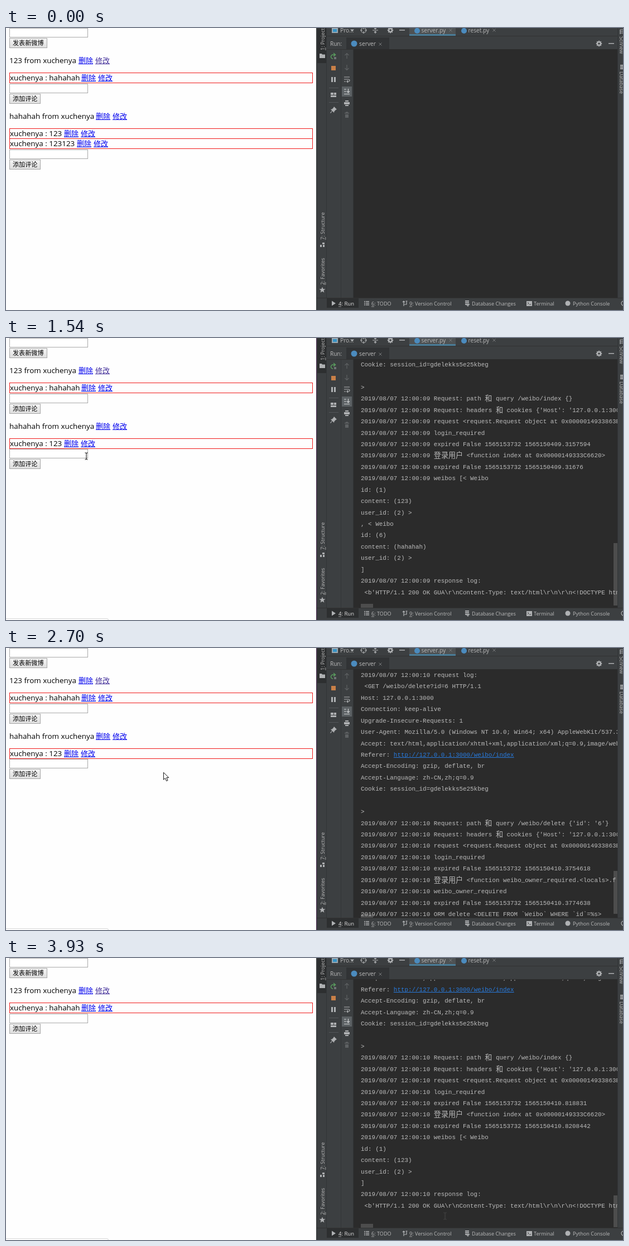
Write an HTML page with a canvas that moves like this. It is 1106 by 506 pixels and loops after 4.02 s.

```html
<!DOCTYPE html>
<html lang="zh">
<head>
<meta charset="utf-8">
<title>Weibo server log</title>
<style>
html, body { margin: 0; width: 100%; height: 100%; overflow: hidden; background: #fefefe; }
canvas { display: block; width: 1106px; height: 506px; }
</style>
</head>
<body>
<canvas id="stage"></canvas>
<script>
const W = 1106, H = 506, LOOP = 4020, USER = 'xuchenya';
const canvas = document.getElementById('stage');
const c = canvas.getContext('2d');
const dpr = window.devicePixelRatio || 1;
canvas.width = W * dpr;
canvas.height = H * dpr;

const SANS = '"Open Sans", "Noto Sans CJK SC", "Noto Sans CJK", sans-serif';
const CJK = '"Noto Sans CJK SC", "Noto Sans CJK", sans-serif';
const MONO = '"Liberation Mono", monospace';
const PANEL = '#3c3f41', DARK = '#2b2b2b', ICON = '#afb1b3', LABEL = '#bbbbbb', DIM = '#5e6163';
const CELL = 6.54, PITCH = 20.43;

// ---------- helpers ----------
function rect(x, y, w, h, fill) {
  c.fillStyle = fill;
  c.fillRect(x, y, w, h);
}
function frame(x, y, w, h, color) {
  c.strokeStyle = color;
  c.lineWidth = 1;
  c.strokeRect(x + .5, y + .5, w - 1, h - 1);
}
function text(s, x, y, size, color, family = SANS) {
  c.font = size + 'px ' + family;
  c.fillStyle = color;
  c.fillText(s, x, y);
}
function path(d, x, y, color, width = 1.2) {
  c.save();
  c.translate(x, y);
  c.strokeStyle = color;
  c.lineWidth = width;
  c.stroke(new Path2D(d));
  c.restore();
}
function shape(d, x, y, color) {
  c.save();
  c.translate(x, y);
  c.fillStyle = color;
  c.fill(new Path2D(d));
  c.restore();
}
function dot(x, y, r, color) {
  c.fillStyle = color;
  c.beginPath();
  c.arc(x, y, r, 0, 7);
  c.fill();
}
function turned(s, x, y, angle, underline) {
  c.save();
  c.translate(x, y);
  c.rotate(angle);
  text(s, 0, 0, 9.1, LABEL);
  if (underline) rect(0, 1.5, 5, .8, LABEL);
  c.restore();
}
function gear(x, y) {
  for (let i = 0; i < 8; i++) {
    c.save();
    c.translate(x, y);
    c.rotate(i * Math.PI / 4);
    rect(-1.1, -5.2, 2.2, 3, ICON);
    c.restore();
  }
  c.strokeStyle = ICON;
  c.lineWidth = 2;
  c.beginPath();
  c.arc(x, y, 2.8, 0, 7);
  c.stroke();
}
const cross = (x, y) => path('M-2.5-2.5L2.5 2.5M2.5-2.5L-2.5 2.5', x, y, '#77797b', 1);

// ---------- web page ----------
function link(s, x, mid, color = '#0000ee') {
  text(s, x, mid + 5, 13, color, CJK);
  rect(x, mid + 6, 26, 1, color);
}
function links(x, mid, first, second) {
  link('删除', x, mid, first);
  link('修改', x + 30, mid, second);
}
function input(y) {
  rect(6, y, 141, 17, '#ffffff');
  frame(6, y, 141, 17, '#a9a9a9');
}
function button(s, y, w) {
  const g = c.createLinearGradient(0, y, 0, y + 18);
  g.addColorStop(0, '#f6f6f6');
  g.addColorStop(1, '#dddddd');
  rect(6, y, w, 18, g);
  frame(6, y, w, 18, '#a6a6a6');
  text(s, 12, y + 13, 11.1, '#000', CJK);
}
function comment(s, x, y, hot) {
  frame(6, y, 544, 19, '#f01818');
  text(USER + ' : ' + s, 7, y + 14, 13.4, '#000');
  links(x, y + 9, hot);
}
function form(y) {
  input(y);
  button('添加评论', y + 18, 56);
}
function page(t) {
  rect(0, 0, 556, H, '#fefefe');
  input(0);
  button('发表新微博', 18, 68);
  text('123 from ' + USER, 6, 63, 13.4, '#000');
  links(130, 58, undefined, '#44309a');
  comment('hahahah', 135, 80);
  form(100);
  if (t < 2780) {
    const pressed = t >= 2320 && t < 2390;
    text('hahahah from ' + USER, 6, 163, 13.4, '#000');
    links(161, 158, pressed ? '#ff0000' : undefined);
    comment('123', 104, 180);
    const two = t < 1460;
    if (two) comment('123123', 127, 198, t >= 1150 && t < 1230 ? '#ff0000' : undefined);
    form(two ? 218 : 199);
  }
  if (t >= 770) {
    c.strokeStyle = '#d8d8d8';
    c.lineWidth = 1;
    c.beginPath();
    c.moveTo(0, 503.5);
    c.lineTo(181, 503.5);
    c.quadraticCurveTo(183.5, 503.5, 183.5, 506);
    c.stroke();
  }
}

// ---------- console ----------
const stamp = sec => '2019/08/07 12:00:' + sec + ' ';
const head = (sec, url) => [
  stamp(sec) + 'request log:',
  ` <GET ${url} HTTP/1.1`,
  'Host: 127.0.0.1:3000',
  'Connection: keep-alive',
  'Upgrade-Insecure-Requests: 1',
  'User-Agent: Mozilla/5.0 (Windows NT 10.0; Win64; x64) AppleWebKit/537.36',
  'Accept: text/html,application/xhtml+xml,application/xml;q=0.9,image/webp',
  'Referer: http://127.0.0.1:3000/weibo/index',
  'Accept-Encoding: gzip, deflate, br',
  'Accept-Language: zh-CN,zh;q=0.9',
  'Cookie: session_id=gdelekks5e25kbeg',
  '',
  '>'
];
const routed = (sec, query, clock) => [
  'Request: path 和 query ' + query,
  "Request: headers 和 cookies {'Host': '127.0.0.1:3000'",
  'request <request.Request object at 0x0000014933863B00>',
  'login_required',
  'expired False 1565153732 ' + clock
].map(s => stamp(sec) + s);
const weibo = (id, content) => [`id: (${id})`, `content: (${content})`, 'user_id: (2) >'];
const indexLog = (sec, a, b, items) => [
  ...routed(sec, '/weibo/index {}', a),
  stamp(sec) + '登录用户 <function index at 0x00000149333C6620>',
  stamp(sec) + 'expired False 1565153732 ' + b,
  stamp(sec) + 'weibos [< Weibo',
  ...items,
  ']',
  stamp(sec) + 'response log:',
  String.raw` <b'HTTP/1.1 200 OK GUA\r\nContent-Type: text/html\r\n\r\n<!DOCTYPE html>`
];
const INDEX = '/weibo/index';
const received = sec => [...head(sec, INDEX).slice(4, 11), '', '', ...head(sec, INDEX)];

const views = [
  { at: 1380, y: 40, bar: [385, 57], lines: received('09') },
  { at: 1460, y: 47, bar: [368, 112], lines: [
    ...head('09', INDEX).slice(10),
    ...indexLog('09', '1565150409.3157594', '1565150409.31676',
      [...weibo(1, '123'), ', < Weibo', ...weibo(6, 'hahahah')])] },
  { at: 2620, y: 48, bar: [400, 77], lines: [
    ...head('10', '/weibo/delete?id=6'),
    ...routed('10', "/weibo/delete {'id': '6'}", '1565150410.3754618'),
    stamp('10') + '登录用户 <function weibo_owner_required.<locals>.f',
    stamp('10') + 'weibo_owner_required',
    stamp('10') + 'expired False 1565153732 1565150410.3774638',
    stamp('10') + 'ORM delete <DELETE FROM `Weibo` WHERE `id`=%s>'] },
  { at: 2780, y: 40, bar: [385, 57], lines: received('10') },
  { at: 2930, y: 35.3, bar: [426, 57], lines: [
    ...head('10', INDEX).slice(6),
    ...indexLog('10', '1565150410.818831', '1565150410.8208442', weibo(1, '123'))] }
];

function logLine(s, y) {
  let x = 636;
  for (const run of s.match(/[\u4e00-\u9fff]+|http:\S+|(?:(?!http:)[^\u4e00-\u9fff])+/g) || []) {
    const wide = /[\u4e00-\u9fff]/.test(run), url = run.startsWith('http:');
    const w = run.length * CELL * (wide ? 2 : 1);
    text(run, x, y + (wide ? 5 : 4), wide ? CELL * 2 : CELL / .6, url ? '#287bde' : LABEL, wide ? CJK : MONO);
    if (url) rect(x, Math.round(y) + 5, w, 1, '#287bde');
    x += w;
  }
}
function consoleView(t) {
  rect(623, 38, 473, 446, DARK);
  const view = views.filter(v => v.at <= t).pop();
  if (!view) return;
  c.save();
  c.beginPath();
  c.rect(623, 39, 473, 445);
  c.clip();
  rect(1089, view.bar[0], 7, view.bar[1], '#4d4d4d');
  rect(636, 477, 22, 7, '#4d4d4d');
  view.lines.forEach((s, i) => logLine(s, view.y + i * PITCH));
  c.restore();
}

// ---------- IDE ----------
function topBar() {
  rect(584, 0, 11, 9, '#9aa7b0');
  rect(586, 2, 7, 5, '#3592c4');
  text('Pro...', 599, 8, 10.2, LABEL);
  shape('M-3-1.5H4L.5 2.5Z', 620, 4, ICON);
  path('M4.5 0A4.5 4.5 0 1 1-4.5 0A4.5 4.5 0 1 1 4.5 0M0-6V-2M0 2V6M-6 0H-2M2 0H6', 641, 4, ICON);
  path('M-5 0H5M0-6V-2M-2-4L0-2L2-4M0 6V2M-2 4L0 2L2 4', 662, 4, ICON);
  gear(689, 4);
  rect(705, 3, 10, 1.5, ICON);
  rect(723, 0, 83, 11, '#4e5254');
  rect(723, 11, 83, 3, '#4a7d99');
  for (const [x, s, end] of [[737, 'server.py', 797], [821, 'reset.py', 875]]) {
    dot(x, 5, 5, '#4b8bbe');
    text(s, x + 7.5, 8, 10.2, LABEL);
    cross(end, 4);
  }
  rect(575, 14, 522, 1, '#323232');
}
function runHeader() {
  text('Run:', 581, 32, 10, LABEL);
  rect(610, 17, 77, 21, '#313335');
  dot(624, 28, 5.5, '#4b8bbe');
  text('server', 633, 32, 10.3, LABEL);
  cross(671, 29);
  gear(1063, 28);
  rect(1080, 27, 10, 1.5, ICON);
  rect(575, 38, 522, 1, '#323232');
}
function runTools() {
  rect(600, 39, 1, 445, '#323537');
  rect(622, 39, 1, 445, '#323537');
  path('M3-3H-1A3.5 3.5 0 0 0-1 4M0-6L3.5-3L0 0', 587, 51, '#599e5e', 1.5);
  rect(588, 52, 4, 4, '#707375');
  rect(583, 68, 8, 8, '#c88048');
  rect(583, 88, 3, 9, ICON);
  rect(588, 88, 3, 9, ICON);
  rect(579, 107, 17, 1, '#54575a');
  rect(582, 116, 5, 4, ICON);
  rect(588, 116, 4, 4, ICON);
  rect(582, 121, 10, 3, ICON);
  rect(579, 133, 17, 1, '#54575a');
  shape('M1-6L6-1L4 0L1.5 2.5L1 5L-2 2L-5 6L-6 5L-2.5 1.5L-5-1L-2.5-1.5L0-4Z', 587, 147, ICON);
  path('M0 5V-4M-3.5-1L0-4.5L3.5-1', 611, 50, DIM);
  path('M0-5V4M-3.5 1L0 4.5L3.5 1', 611, 71, DIM);
  path('M-5-4H5M-5 0H3A2 2 0 0 1 3 4H0M2 2L0 4L2 6M-5 4H-2', 611, 92, ICON);
  rect(602, 105, 18, 18, '#5c6164');
  path('M-5-4H-1M-5 0H-1M-5 4.5H5M2.5-5V2M0-.5L2.5 2L5-.5', 611, 114, '#d0d2d3');
  rect(608, 130, 6, 2, ICON);
  rect(606, 133, 10, 4, ICON);
  rect(608, 138, 6, 2, ICON);
  rect(607, 152, 8, 1.5, DIM);
  rect(609, 150.5, 4, 1.5, DIM);
  rect(608, 155, 6, 6, DIM);
}
function sideBars() {
  rect(558, 0, 17, 63, '#2d2f30');
  turned('1: Project', 571, 40, -Math.PI / 2, true);
  shape('M-5-4H-1L0-2.5H5V4H-5Z', 567, 50, ICON);
  turned('7: Structure', 571, 380, -Math.PI / 2, true);
  rect(567, 385, 4, 3, ICON);
  rect(563, 389, 3, 4, ICON);
  rect(568, 389, 3, 4, ICON);
  turned('2: Favorites', 571, 461, -Math.PI / 2, true);
  shape('M0-5.5L1.5-1.8L5.5-1.6L2.4.8L3.4 4.8L0 2.6L-3.4 4.8L-2.4.8L-5.5-1.6L-1.5-1.8Z', 567, 470, ICON);
  rect(574, 0, 1, 485, '#323537');
  rect(1096, 0, 1, 485, '#323537');
  turned('SciView', 1100, 15, Math.PI / 2);
  turned('Database', 1100, 78, Math.PI / 2);
  path('M-3-4H4M-3-1H4M-3 2H4M-3-4V4', 1104, 7, ICON);
  for (let i = 0; i < 3; i++) rect(1101, 66 + i * 3, 5, 2, ICON);
}
function bottomBar() {
  rect(557, 484, 549, 1, '#323232');
  rect(575, 485, 57, 17, '#2d2f30');
  shape('M-3-4.5L4 0L-3 4.5Z', 587, 494, ICON);
  const labels = [['4: Run', 596, 9.5], ['6: TODO', 655, 9.1], ['9: Version Control', 723, 9.1],
    ['Database Changes', 835, 9.1], ['Terminal', 946, 9.1], ['Python Console', 1016, 9.1]];
  labels.forEach(([s, x, size], i) => {
    text(s, x, 498, size, i ? LABEL : '#e0e0e0');
    if (i < 3) rect(x, 499.5, 5, .8, LABEL);
  });
  for (let i = 0; i < 3; i++) {
    rect(642, 490 + i * 3, 2, 1.5, ICON);
    rect(645, 490 + i * 3, 6, 1.5, ICON);
    rect(823, 489 + i * 3, 7, 2, ICON);
  }
  path('M-2-4V5M-4-2L-2-4L0-2M-2 2H3V-4M1.5-4H4.5', 715, 494, ICON);
  path('M0 2L2 4L5 0', 826, 495, ICON);
  rect(933, 490, 10, 9, ICON);
  path('M-3-2L-1 0L-3 2M0 2H3', 938, 494, PANEL, 1);
  dot(1007, 494, 4.5, ICON);
  path('M3-4A4 4 0 0 0 3 4', 1104, 494, ICON);
}
function ide(t) {
  rect(556, 0, 550, H, PANEL);
  rect(556, 0, 1, H, t >= 1150 && t < 3930 ? '#4a2750' : '#323537');
  topBar();
  runHeader();
  runTools();
  sideBars();
  consoleView(t);
  bottomBar();
}

// ---------- pointer ----------
const beam = 'M-2.5-6H-.8L0-5L.8-6H2.5M0-5V5M-2.5 6H-.8L0 5L.8 6H2.5';
const arrow = 'M0 0V13L3 10.3L5.2 15.4L7.6 14.3L5.4 9.4H9.4Z';
const hand = 'M-1.5 1.5C-1.5-.5 1.5-.5 1.5 1.5V7C2-.0 4.2 6 4.4 7.5C5 6.5 6.8 6.8 6.8 8.3C7.5 7.5 9 8 9 9.5V13C9 16 7 17 6.8 19H-.5C-.5 17-4.5 13.5-5 11C-5 9.4-3 9.2-1.5 11.5Z';

// [start, steps, from x, from y, to x, to y]; the pointer hops once per step
const STEP = 77;
const legs = [
  [150, 7, 787, 463, 145, 224],
  [690, 2, 144, 215, 143, 212],
  [1460, 1, 144, 212, 144, 212],
  [1610, 4, 144, 212, 171, 168],
  [1920, 2, 169, 165, 168, 163],
  [2620, 4, 180, 168, 575, 381],
  [2925, 3, 600, 391, 652, 411],
  [3160, 1, 808, 472, 808, 472],
  [3240, 1, 787, 463, 787, 463]
];
function pointer(t) {
  const leg = legs.filter(l => l[0] <= t).pop();
  if (!leg) return;
  const [start, n, x0, y0, x1, y1] = leg;
  const k = n > 1 ? Math.min(1, Math.floor((t - start + 1) / STEP) / (n - 1)) : 1;
  const e = k * k * (3 - 2 * k);
  const x = x0 + (x1 - x0) * e, y = y0 + (y1 - y0) * e;
  const onLink = (t >= 690 && t < 1460) || (t >= 1920 && t < 2620);
  const inField = x > 6 && x < 147 && (t < 1460 ? y > 218 && y < 235 : y > 199 && y < 216);
  if (x > 622) path(beam, x, y, '#404040', 1);
  else if (inField) path(beam, x, y, '#000', 1);
  else {
    const d = onLink ? hand : arrow;
    shape(d, x, y, '#fff');
    path(d, x, y, '#111', 1);
    if (onLink) path('M1.5 7V10M4.4 7.5V10M6.8 8.5V10.5', x, y, '#111', .8);
  }
}

function draw(t) {
  c.setTransform(dpr, 0, 0, dpr, 0, 0);
  page(t);
  ide(t);
  if ((t >= 150 && t < 1380) || t >= 2780) path(beam, 787, 463, '#3d3d3d', 1);
  pointer(t);
}
const began = performance.now();
function tick() {
  draw((performance.now() - began) % LOOP);
  requestAnimationFrame(tick);
}
draw(0);
requestAnimationFrame(tick);
</script>
</body>
</html>
```
